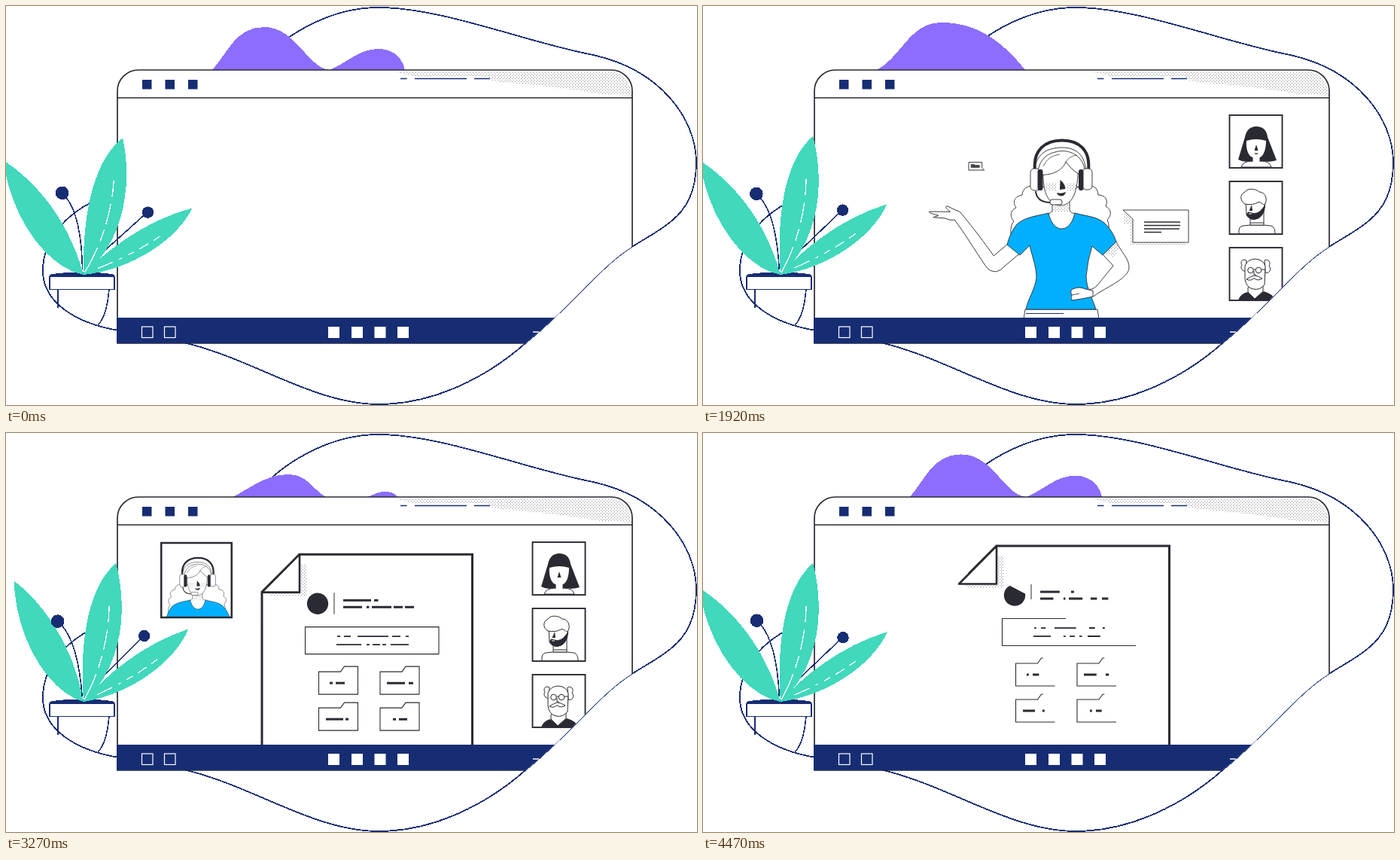
These frames come from a looping animation (918 px wide and 530 px high, 4500 ms). An HTML page:

```html
<!DOCTYPE html>
<html lang="en">
<head>
<meta charset="utf-8">
<title>Online meeting</title>
<style>
html, body { margin: 0; width: 100%; height: 100%; overflow: hidden; background: #fff; }
svg { display: block; width: 918px; height: 530px; }
.crisp { shape-rendering: crispEdges; }
#say path, #note path { vector-effect: non-scaling-stroke; }
</style>
</head>
<body>
<svg id="stage" viewBox="0 0 918 530" fill="none"></svg>
<script>
const NAVY = '#172d73', INK = '#2a2a33', MINT = '#41d8bc', LOOP = 4500;

const path = (d, attrs = '') => `<path d="${d}" ${attrs}/>`;
const rect = (x, y, w, h, attrs = '') => `<rect x="${x}" y="${y}" width="${w}" height="${h}" ${attrs}/>`;
const circle = (x, y, r, attrs = '') => `<circle cx="${x}" cy="${y}" r="${r}" ${attrs}/>`;
const group = (id, body, attrs = '') => `<g id="${id}" ${attrs}>${body}</g>`;
const ink = w => `stroke="${INK}" stroke-width="${w}"`;
const dots = d => path(d, 'fill="url(#dots)"');
const trim = (d, w) => path(d, `class="trim" pathLength="1" ${ink(w)}`);
// pairs of start and end x on one row
const bars = (y, w, ...xs) => xs.map((x, i) => i % 2 ? '' : trim(`M${x},${y}H${xs[i + 1]}`, w)).join('');

const blob = 'M350,62C376,38 430,2 495,2C580,2 690,48 780,65C870,85 917,150 917,208' +
  'C917,275 880,290 833,319C790,345 750,400 690,448C640,492 570,529 495,529' +
  'C410,529 330,470 240,448C195,436 180,434 150,431C95,422 49,395 49,352C49,305 85,275 115,260';

const frame = 'M148,448V113A28,28 0 0 1 176,85H804A28,28 0 0 1 832,113V448Z';

function bubble() {
  const row = (y, x) => path(`M333,${y}H${x}`, ink(1.3));
  return dots('M317,196H321V234H396V238H317Z') +
    path('M321,190H395V222L408,234H321Z', `fill="#fff" ${ink(0.9)}`) +
    row(204.5, 355) + row(208.5, 382) + row(213, 382) + row(217.5, 382);
}

function answer() {
  const row = (y, x) => path(`M586,${y}H${x}`, ink(1.3));
  return dots('M560,275H571V314H642V318H567V290H560Z') +
    path('M558,271H645V314H571V283Z', `fill="#fff" ${ink(0.9)}`) +
    row(287, 634) + row(291.5, 634) + row(296, 633) + row(300.5, 609);
}

function woman() {
  const skin = `fill="#fff" ${ink(0.9)} stroke-linejoin="round"`;
  const arm = path('M407,317L387,332C376,314 362,293 346,271L340,268L329,262C326,263 328,266 333,270L320,269' +
    'L305,268C304,270 312,272 317,274L310,276L325,278Q332,282 338,281C350,299 362,322 375,344' +
    'Q380,353 389,353Q396,352 400,347L424,329Z', skin);
  return path('M446,240C432,236 424,243 424,251C413,253 411,261 416,268C407,272 408,281 413,286Q408,291 409,303' +
      'L538,303Q541,292 537,284C544,277 542,270 535,266C539,257 534,251 525,251C524,240 518,237 508,241Z', skin) +
    group('arm', arm) +
    path('M549,313C554,325 567,336 566,348C565,361 540,372 524,382Q516,389 503,389L490,391Q488,387 490,384' +
      'Q487,378 491,376Q500,372 508,376Q517,378 523,372L545,345L531,330Z', skin) +
    path('M428,403H524L526,416H426Z', skin) + path('M429,408.5H479', `stroke="${NAVY}" stroke-width="1"`) +
    path('M464,255V272Q462,275 458,276Q464,300 476,300Q490,300 495,276Q488,275 487,271V255Z', skin) +
    dots('M464,264H486V274H464Z') +
    path('M459,275C444,279 428,280 417,290Q408,301 404,317L421,331L434,318C437,332 443,346 443,361' +
      'C441,377 432,388 429,403H522C518,390 509,374 509,359Q511,337 517,319L531,331L549,313' +
      'Q544,298 533,288C522,279 507,279 494,275C488,303 465,303 459,275Z',
      `fill="#00b0ff" ${ink(0.9)}`) +
    path('M490,391Q488,387 490,384Q487,378 491,376Q500,372 508,376L518,378V386L503,389Z', skin) +
    path('M490,384L500,382', ink(0.8)) + dots('M534,328L549,314L553,322L545,334Z') +
    path('M441,222C440,198 456,188 477,188C498,188 511,200 509,232L500,240H447Z', skin) +
    path('M452,219C451,242 456,264 475,265C494,264 499,240 498,209Q482,202 452,219Z', skin) +
    path('M444,224C446,208 453,197 468,194C482,190 496,195 503,206C508,213 507,221 506,226' +
      'Q494,223 482,207C478,218 464,226 444,224Z', skin) +
    path('M482,207Q487,199 497,198M452,213Q458,199 474,197', ink(0.7)) +
    dots('M456,235H469V246H456ZM483,235H495V246H483Z') +
    path('M474.5,231Q481,236 481.5,243L474,244Z', `fill="${INK}"`) +
    path('M470,248Q476,250 482,247Q481,252 476,252.5Q471,252 470,248Z', `fill="${INK}"`) +
    path('M441,218C438,191 455,178.5 477,178.5C499,178.5 515,191 512,218', ink(4)) +
    rect(435, 216, 13, 29, `rx="5" ${skin}`) + rect(444.5, 217, 7, 28, `rx="3" fill="${INK}"`) +
    rect(504, 216, 13, 28, `rx="5" ${skin}`) + rect(499, 217, 6.5, 28, `rx="3" fill="${INK}"`) +
    path('M442,246C443,256 450,261 462,261', ink(2)) +
    rect(461, 257, 16, 7, `rx="3" ${skin}`);
}

const card = y => rect(699.5, y, 70, 70, `fill="#fff" ${ink(1.9)}`);
const LINE = `fill="#fff" ${ink(1)}`;

const girl = () => card(145) +
  path('M715,214Q717,206 730,206H741Q753,206 755,214Z', LINE) +
  path('M711,204L720,174Q723,160 735,160Q748,160 750,174L762,205Q753,208 744,206H728Q718,208 711,204Z',
    `fill="${INK}"`) +
  path('M722,179Q735,175 748,179C748,190 745,199 740,201V207H730V201C724,199 721,189 722,179Z', 'fill="#fff"') +
  path('M730,201V207M740,201V207', ink(1)) +
  path('M735,184L737.5,192L732.5,192Z', `fill="${INK}"`) +
  group('mouth', path('M732,195.5H738Q735,198.5 732,195.5Z', `fill="${INK}"`));

const man = () => card(233) +
  path('M712,302Q711,293 717,292L727,291H745L755,292Q760,294 760,302', LINE) +
  path('M727,278V291H745V272Z', LINE) + path('M727,288H745', ink(1)) +
  path('M721,258L722,278Q727,286 737,282Q746,277 747,260Z', LINE) +
  path('M747,263C747,276 741,283 732,284Q725,283 722,277L724,273.5L731,275Q739,277 747,263Z', `fill="${INK}"`) +
  path('M725,276H729', 'stroke="#fff" stroke-width="1.2"') +
  path('M729,264L730,272L725.5,272Z', `fill="${INK}"`) +
  path('M720,263C713,259 713,250 720,247C724,241 735,243 739,247C747,247 751,257 746,264C742,263 740,259 737,261Q730,265 720,263Z', LINE) +
  `<g clip-path="url(#cardClip)">` + group('wave',
    path('M750,302L751,284L753,279Q751,271 752,265Q754,262 756,270L759,263Q762,262 762,267V282L765,284V302Z', LINE) +
    path('M750,285H764M756,270V277', ink(0.8))) + '</g>';

const elder = () => card(321) +
  path('M711,391Q713,383 723,380L733,388L745,379Q757,382 760,391Z', `fill="${INK}"`) +
  path('M724,374V380L733,389L744,379V368Z', LINE) +
  path('M722,338C717,335 713,340 716,344C713,348 717,353 721,352ZM746,338C751,335 755,341 752,345C756,350 752,356 747,354Z', LINE) +
  path('M720,345Q724,336 734,336Q745,337 747,346L746,370Q740,378 731,376Q721,374 720,362Z', LINE) +
  circle(727.5, 351, 3.8, LINE) + circle(738, 351, 3.8, LINE) +
  path('M731.5,350H734M742,350H747', ink(1)) +
  path('M732,352V357H735', ink(1)) +
  path('M732,358Q728,359 722,363Q728,366 732,361.5Q737,366 743,362Q737,358 732,358Z', LINE);

function folder(x, y, ...label) {
  return trim(`M${x + 52},${y + 37}H${x}V${y + 7}H${x + 29}L${x + 34},${y}H${x + 52}V${y + 37}`, 1.1) +
    bars(y + 22, 3, ...label);
}

const sheet = () =>
  trim('M619.5,420V150H390L340,200V420', 3) +
  dots('M391,163H400V204H391ZM350,202H398V206H350Z') +
  path('M390,150V200.5H340Z', `fill="#fff" ${ink(2.6)} stroke-linejoin="round"`) +
  path('', `id="disc" fill="${INK}"`) + trim('M436,201V229.5', 1) +
  bars(211, 3, 448, 485, 489, 494.5) +
  bars(220, 3, 448, 473, 479, 482.5, 486, 512, 515, 527, 530, 542) +
  trim('M575,282.5H397.5V246.5H575V282.5', 1.1) +
  bars(259, 1.8, 440, 444, 449, 458, 467, 508, 513, 524, 531, 535) +
  bars(270, 1.8, 439, 472, 479, 483, 487, 497, 500, 505, 511, 535) +
  folder(415.5, 299, 430, 434, 438, 450) + folder(497, 299, 506, 530, 535, 541) +
  folder(415.5, 347, 425, 448, 451, 455) + folder(497, 347, 514, 518, 522, 533);

const squares = (xs, y, size, attrs) => xs.map(x => rect(x, y, size, size, attrs)).join('');

const plant = () => {
  const leaf = d => path(d, `fill="${MINT}"`);
  const vein = (d, dash) => path(d, `stroke="#fff" stroke-width="1.4" stroke-dasharray="${dash}"`);
  const stem = `stroke="${NAVY}" stroke-width="1.6"`;
  return path('M69,376V401M137,376Q134,412 122,424', stem) +
    `<ellipse cx="101" cy="358" rx="43.5" ry="4.3" fill="${NAVY}"/>` +
    rect(58, 359.5, 86, 17, `fill="#fff" ${stem}`) +
    group('leafL', leaf('M103,357C60,346 13,280 9,197C46,225 88,278 103,357Z')) +
    group('berries', path('M66,251C88,268 97,310 101,350M181,267Q158,292 127,324', stem) +
      circle(66, 251, 8.8, `fill="${NAVY}"`) + circle(181.5, 267.5, 7.7, `fill="${NAVY}"`)) +
    group('leafM', leaf('M103,357C98,290 105,208 146,173C162,230 156,312 103,357Z') +
      vein('M137,230C137,268 125,318 104,354', '21 10 28 8 16 9 40')) +
    group('leafR', leaf('M103,357C128,324 180,278 240,257C222,303 163,346 103,357Z') +
      vein('M121,347Q165,326 200,298', '22 9 4 9 9 8 14 8'));
};

document.getElementById('stage').innerHTML = `
<defs>
  <pattern id="dots" width="4" height="4" patternUnits="userSpaceOnUse">
    ${rect(0, 0, 1, 1, 'fill="#8a8a90"')}${rect(2, 2, 1, 1, 'fill="#8a8a90"')}
  </pattern>
  <clipPath id="winClip">${path('M140,80H840V319H833C790,345 750,400 690,448V450H140Z')}</clipPath>
  <clipPath id="cardClip">${rect(700, 234, 69, 68.5)}</clipPath>
  <clipPath id="camClip">${rect(0, 0, 0, 0, 'id="camBox"')}</clipPath>
</defs>
${path(blob, `class="crisp" stroke="${NAVY}" stroke-width="1.8"`)}
${path('', 'id="hills" class="crisp" fill="#8c6dff"')}
<g clip-path="url(#winClip)">
  ${path(frame, 'fill="#fff"')}
  ${dots('M515,87H806Q828,90 831,119L790,117L760,112L720,107L680,103L648,100L640,93H540Z')}
  ${path('M148,122H832', ink(1.6))}
  ${squares([181, 211.5, 242], 98, 12.5, `fill="${NAVY}"`)}
  ${path('M524,96.5H532.5M543,96.5H612M622,96.5H643', `stroke="${NAVY}" stroke-width="1.6"`)}
  ${group('cam', `<g clip-path="url(#camClip)">${group('woman', woman())}</g>` +
    rect(0, 0, 0, 0, `id="camFrame" stroke="${INK}"`))}
  ${group('say', bubble())}${group('reply', answer())}
  ${group('girl', girl())}${group('man', man())}${group('elder', elder())}
  ${group('note', bubble())}
  ${group('sheet', sheet())}
  ${path(frame, ink(1.7))}
  ${rect(147, 414, 700, 34, `fill="${NAVY}"`)}
  ${squares([180.5, 210.5], 426, 14.5, 'stroke="#fff" stroke-width="1.2"')}
  ${squares([428, 459, 489.5, 520], 426, 15, 'fill="#fff"')}
  ${path('M700,433H708', 'stroke="#fff" stroke-width="1.4"')}
</g>
${group('plant', plant(), 'class="crisp"')}`;

const el = Object.fromEntries([...document.querySelectorAll('[id]')].map(n => [n.id, n]));
const trims = document.querySelectorAll('.trim');
const set = (n, attrs) => { for (const k in attrs) n.setAttribute(k, attrs[k]); };

const ramp = (t, a, b) => Math.min(1, Math.max(0, (t - a) / (b - a)));
const mix = (a, b, k) => a + (b - a) * k;
const out = u => 1 - (1 - u) ** 3;
const inOut = u => u < 0.5 ? 4 * u ** 3 : 1 - 4 * (1 - u) ** 3;
const wave = (t, peak, period) => Math.cos(2 * Math.PI * (t - peak) / period);

const turn = (n, deg, x = 103, y = 357) => set(n, { transform: `rotate(${deg.toFixed(3)} ${x} ${y})` });
function zoom(n, k, x, y, toX = x, toY = y) {
  set(n, { transform: `translate(${toX} ${toY}) scale(${k}) translate(${-x} ${-y})`,
    visibility: k > 0.01 ? 'visible' : 'hidden' });
}
// grows from a to b, shrinks from c to d
const pop = (t, a, b, c, d) => out(ramp(t, a, b)) * (1 - ramp(t, c, d) ** 3);

// big hill: left, controls, peak, controls, right; small hill: left, peak, right
const HILL_T = [0, 1110, 1920, 2820, 3270, 4080];
const HILLS = [
  [274, 295, 62, 305, 343, 28, 385, 400, 82, 430, 430, 495, 57, 530],
  [228, 290, 70, 297, 343, 24, 375, 405, 42, 443, 484, 502, 80, 519],
  [231, 265, 66, 275, 316, 22, 345, 385, 30, 428, 500, 505, 88, 512],
  [280, 305, 68, 340, 368, 49, 395, 403, 70, 425, 503, 507, 83, 511],
  [301, 322, 75, 345, 375, 55, 400, 405, 73, 425, 480, 502, 78, 520],
  [281, 300, 60, 315, 347, 41, 385, 395, 70, 415, 455, 495, 65, 525]
];

function hills(t) {
  const n = HILL_T.length;
  const time = i => HILL_T[(i + n) % n] + LOOP * Math.floor(i / n);
  const val = (i, j) => HILLS[(i + n) % n][j];
  let i = n - 1;
  while (t < HILL_T[i]) i--;
  const h = time(i + 1) - time(i), u = (t - time(i)) / h;
  const slope = (k, j) => (val(k + 1, j) - val(k - 1, j)) / (time(k + 1) - time(k - 1)) * h;
  const v = HILLS[i].map((a, j) => {
    const b = val(i + 1, j);
    return a * (1 + 2 * u) * (1 - u) ** 2 + b * u * u * (3 - 2 * u) +
      slope(i, j) * u * (1 - u) ** 2 - slope(i + 1, j) * u * u * (1 - u);
  });
  const [l, ax, ay, bx, px, py, cx, dx, dy, r, l2, p2, y2, r2] = v;
  return `M${l},85C${ax},${ay} ${bx},${py} ${px},${py}C${cx},${py} ${dx},${dy} ${r},85Z` +
    `M${l2},85C${mix(l2, p2, 0.4)},${mix(85, y2, 0.4)} ${mix(l2, p2, 0.6)},${y2} ${p2},${y2}` +
    `C${mix(p2, r2, 0.55)},${y2} ${mix(p2, r2, 0.9)},${mix(85, y2, 0.6)} ${r2},85Z`;
}

function draw(t) {
  set(el.hills, { d: hills(t) });

  const sway = 2.3 * (1 + wave(t, 0, 2490));
  turn(el.berries, sway);
  turn(el.leafR, sway);
  turn(el.leafL, -0.39 * (6 - 8 * wave(t, 940, 2490)));
  turn(el.leafM, 2.8 * (1 - ramp(t, 0, 1665)));

  // presenter rises, then shrinks into a camera tile
  const p = inOut(ramp(t, 2550, 3250)), q = inOut(ramp(t, 2280, 2600));
  const rise = 250 * (1 - out(ramp(t, 100, 900)));
  const gone = 1 - ramp(t, 4180, 4400) ** 3;
  zoom(el.woman, 1 - 0.42 * p, 475, 177, 475 - 221 * p, 177 - 12 * p + rise);
  turn(el.arm, -1.75 * (1 - wave(t, 1110, 1620)), 386, 345);
  const w = mix(682, 158 - 64.5 * p, q), h = mix(292, 140 - 41 * p, q);
  const cx = mix(490, 477.3 - 224.3 * p, q), cy = mix(269, 234.3 - 38.8 * p, q);
  const box = { x: cx - w / 2, y: cy - h / 2, width: w, height: h };
  set(el.camBox, box);
  set(el.camFrame, { ...box, 'stroke-width': 1.4 + 1.1 * p, opacity: q });
  zoom(el.cam, t < 100 ? 0 : gone, 253, 195.5);

  zoom(el.say, pop(t, 650, 1000, 1700, 1942), 363, 213);
  zoom(el.reply, pop(t, 1500, 1850, 2200, 2450), 603, 294);
  zoom(el.girl, pop(t, 700, 1100, 4180, 4400), 734.5, 180);
  zoom(el.man, pop(t, 1010, 1410, 4180, 4400), 734.5, 268);
  zoom(el.elder, pop(t, 1300, 1700, 4180, 4400), 734.5, 356);
  zoom(el.note, 0.33 * pop(t, 3700, 4000, 4150, 4350), 364, 213, 692, 161.5);
  set(el.mouth, { opacity: t > 2300 && t < 3600 ? 0 : 1 });
  set(el.wave, { transform: `translate(0 ${45 * (1 - out(ramp(t, 3600, 3950)))})` });

  // sheet slides up, later its strokes run out
  const up = out(ramp(t, 2430, 3715)), cut = 0.002 * Math.max(0, t - 4320);
  set(el.sheet, { transform: `translate(0 ${270 * (1 - up)})`, visibility: up > 0 ? 'visible' : 'hidden' });
  for (const n of trims) set(n, { 'stroke-dasharray': cut ? `${1 - cut} 2` : 'none' });
  const end = -0.14 + 2 * Math.PI * Math.min(0.9999, 1 - cut);
  const at = a => `${414 + 14.2 * Math.cos(a)},${215.5 + 14.2 * Math.sin(a)}`;
  set(el.disc, { d: `M${at(-0.14)}A14.2,14.2 0 1 1 ${at(end)}Z` });
}

const begin = performance.now();
function tick() {
  draw((performance.now() - begin) % LOOP);
  requestAnimationFrame(tick);
}
draw(0);
requestAnimationFrame(tick);
</script>
</body>
</html>
```
